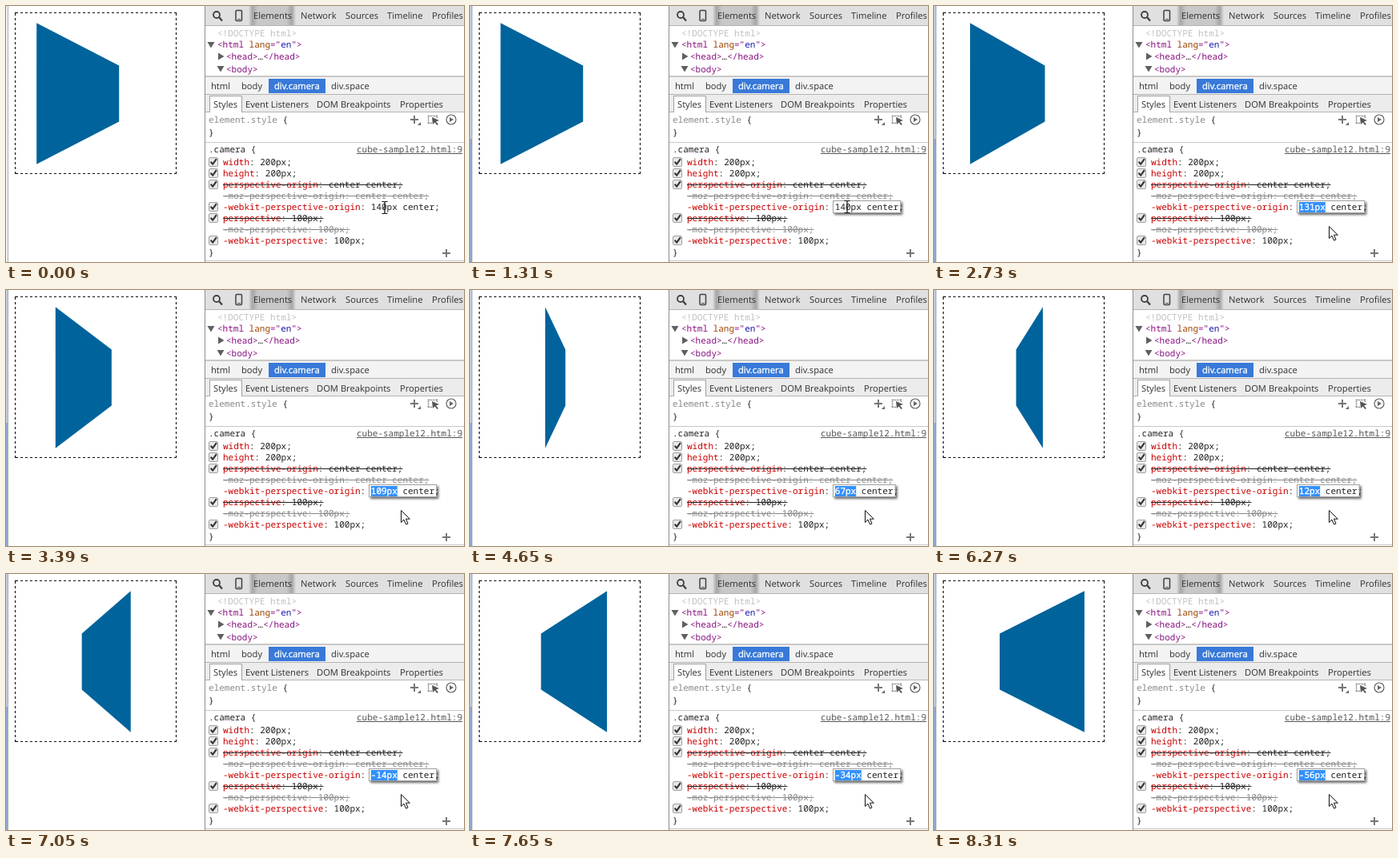
An HTML page for the animation above (9.24 s loop, 572x320 px).

```html
<!DOCTYPE html>
<html lang="en">
<head>
<meta charset="utf-8">
<title>Perspective origin</title>
<style>
html, body { margin: 0; width: 100%; height: 100%; overflow: hidden; background: #fff; }
svg { display: block; }
text { white-space: pre; text-rendering: geometricPrecision; }
.mono { font: 11px "Noto Sans Mono", "DejaVu Sans Mono", monospace; fill: #222; }
.ui { font: 11.2px "Open Sans", "Noto Sans", sans-serif; fill: #303030; }
.tag { fill: #881280; }
.attr { fill: #994500; }
.str { fill: #1a1aa6; }
.prop { fill: #c80000; }
.dim { fill: #888; }
.pale { fill: #c0c0c0; }
.link { fill: #555; }
.lit { fill: #fff; stroke: #fff; stroke-width: .35; }
.icon { fill: none; stroke: #606060; stroke-width: 1.5; }
</style>
</head>
<body>
<svg width="572" height="320" viewBox="0 0 572 320">
  <defs>
    <linearGradient id="tab">
      <stop offset="0" stop-color="#e0e0e0"/>
      <stop offset=".08" stop-color="#a6a6a6"/>
      <stop offset=".2" stop-color="#c8c8c8"/>
      <stop offset=".8" stop-color="#c8c8c8"/>
      <stop offset=".92" stop-color="#a6a6a6"/>
      <stop offset="1" stop-color="#e0e0e0"/>
    </linearGradient>
    <filter id="shade" x="-10%" y="-30%" width="125%" height="200%">
      <feDropShadow dx="2" dy="2" stdDeviation="1.5" flood-opacity=".6"/>
    </filter>
    <g id="check">
      <rect x=".5" y=".5" width="11" height="11" rx="1.5" fill="#e8e8e8" stroke="#a0a0a0"/>
      <path d="M2.6 5.8L5.2 8.700L9.900 2.200" fill="none" stroke="#333" stroke-width="2.100"/>
    </g>
  </defs>

  <g id="idle">
    <path d="M0 0H2V320H0Z" fill="#f0f0f0"/>
    <path d="M2.5 0V320" stroke="#b0b0b0"/>
  </g>
  <g id="active">
    <path d="M0 0H2V320H0Z" fill="#c4cbdc"/>
    <path d="M0 166H2V320H0Z" fill="#8fa9d4"/>
    <path d="M2.5 0V320" stroke="#a4aab8"/>
  </g>
  <path d="M12 8.500H212M12 209.500H212M11.500 9V209M212.500 9V209" stroke="#000" stroke-dasharray="3 3"/>
  <path d="M11 8h1v1h-1z M212 8h1v1h-1z M11 209h1v1h-1z M212 209h1v1h-1z"/>
  <polygon id="face" fill="#00639c"/>

  <g id="panel">
    <path d="M249 0H572V24H249Z" fill="#e0e0e0"/>
    <path d="M249 89H572V110H249Z" fill="#f3f3f3"/>
    <path d="M249 110H572V133H249Z" fill="#ececec"/>
    <path d="M303 0H362V24H303Z" fill="url(#tab)"/>
    <path d="M328 91H399V109H328Z" fill="#3879d9"/>
    <path d="M254.500 133V112.500H294.500V133" fill="#fff" stroke="#a0a0a0"/>
    <path d="M249 24.500H572M249 110.500H572M249 132.500H254M295 132.500H572" stroke="#b4b4b4"/>
    <path d="M249 88H572" stroke="#c8c8c8" stroke-width="2"/>
    <path d="M249 170.500H572M249 318.500H572" stroke="#c8c8c8"/>
    <path d="M248.500 0V320" stroke="#8c8c8c"/>

    <g class="icon">
      <circle cx="263" cy="11" r="4" stroke="#404040" stroke-width="1.8"/>
      <path d="M266 14L270 18.500" stroke="#404040" stroke-width="2.3"/>
      <rect x="287" y="5.500" width="7.500" height="13" rx="1.300" stroke="#404040"/>
      <path d="M289 16.500H293" stroke-width="1"/>
      <path d="M505 142H515M510 137V147" stroke-width="2" stroke="#777"/>
      <path d="M527 137.500H539M527 146.500H532M527.500 137V147M538.500 137V141" stroke-dasharray="1 1"/>
      <circle cx="556" cy="142" r="6" stroke-width="1.200"/>
      <path d="M545 309H555M550 304V314" stroke-width="2" stroke="#777"/>
    </g>
    <path d="M514 149H518V145Z M554 139V145L559 142Z" fill="#666"/>
    <path d="M532 139L541 143L537 144.500L540 148L538.500 149L535.500 145.500L533 148Z" fill="#555"/>
    <path d="M251.500 45H260.500L256 52.500Z M265 58.500L272.500 63L265 67.500Z M263.500 75H272.500L268 82.500Z" fill="#606060"/>
  </g>

  <use id="tick" href="#check" x="253" y="245"/>
  <g id="editor">
    <rect id="field" x="453.500" y="243.500" height="15" fill="#fff" stroke="#a0a0a0" filter="url(#shade)"/>
    <rect id="mark" x="455.800" y="245" height="13" fill="#3390ff"/>
  </g>
  <text id="value" class="mono" x="455.800" y="255"><tspan></tspan><tspan></tspan><tspan></tspan></text>

  <path id="beam" d="M-3.500 -7.500H-1Q0 -7.500 0 -6Q0 -7.500 1 -7.500H3.500M0 -6.500V6.500M-3.500 7.500H-1Q0 7.500 0 6Q0 7.500 1 7.500H3.500" fill="none" stroke="#111" stroke-width="1.200"/>
  <path id="arrow" d="M.5 .5V15.500L4 12.200L6.500 18L9 17L6.500 11.200H11.300Z" fill="#fff" stroke="#111"/>
</svg>
<script>
const $ = id => document.getElementById(id);
const panel = $("panel");
const CHAR = 6.6, LOOP = 9240;

function add(tag, attrs, parent = panel) {
  const el = document.createElementNS("http://www.w3.org/2000/svg", tag);
  for (const key in attrs) el.setAttribute(key, attrs[key]);
  parent.append(el);
  return el;
}

// Each part is a plain string or a [class, string] pair.
function write(font, x, y, ...parts) {
  const line = add("text", { class: font, x, y });
  for (const part of parts) {
    const [cls, str] = Array.isArray(part) ? part : ["", part];
    add("tspan", { class: cls }, line).textContent = str;
  }
}

function strike(y, chars, color) {
  add("path", { d: `M271 ${y - 3.5}h${chars * CHAR}`, stroke: color });
}

function declare(y, name, value, state = "") {
  const dim = state === "dim";
  write("mono", 271, y, [dim ? "dim" : "prop", name], [dim ? "dim" : "", ": " + value]);
  if (state) strike(y, name.length + 2 + value.length, dim ? "#888" : "#222");
  if (!dim && value) add("use", { href: "#check", x: 253, y: y - 10 });
}

[[309, "Elements"], [368, "Network"], [424, "Sources"], [476, "Timeline"], [532, "Profiles"]]
  .forEach(([x, label]) => write("ui", x, 16, label));
[[256, "html"], [294, "body"], [406, "div.space"]]
  .forEach(([x, label]) => write("ui", x, 104, label));
write("ui", 335, 104, ["lit", "div.camera"]);
[[259, "Styles"], [299, "Event Listeners"], [388, "DOM Breakpoints"], [492, "Properties"]]
  .forEach(([x, label]) => write("ui", x, 127, label));

write("mono", 264, 38, ["pale", "<!DOCTYPE html>"]);
write("mono", 264, 52, ["tag", "<html "], ["attr", "lang"], ["tag", "=\""], ["str", "en"], ["tag", "\">"]);
write("mono", 275, 67, ["tag", "<head>"], "…", ["tag", "</head>"]);
write("mono", 275, 83, ["tag", "<body>"]);

write("mono", 253, 146, ["dim", "element.style"], " {");
write("mono", 253, 162, "}");
write("mono", 253, 183, ".camera {");
write("mono", 438, 183, ["link", "cube-sample12.html:9"]);
add("path", { d: "M438 184.5H570", stroke: "#555" });
declare(199, "width", "200px;");
declare(213, "height", "200px;");
declare(227, "perspective-origin", "center center;", "off");
declare(241, "-moz-perspective-origin", "center center;", "dim");
declare(255, "-webkit-perspective-origin", "");
declare(269, "perspective", "100px;", "off");
declare(283, "-moz-perspective", "100px;", "dim");
declare(297, "-webkit-perspective", "100px;");
write("mono", 253, 312, "}");

// One key press, then key repeat at two units per 60 ms.
function originAt(t) {
  if (t < 2020) return 140;
  if (t < 2550) return 139;
  const step = Math.floor((Math.min(t, 8310) - 2550) / 60);
  return 137 - 2 * step - (t >= 5040 ? 1 : 0);
}

// A 100px square turned 60 degrees, seen from 100px.
function drawFace(origin) {
  const depth = 50 * Math.sin(Math.PI / 3);
  const near = 100 / (100 - depth), far = 100 / (100 + depth);
  const xn = 12.8 + origin + (75 - origin) * near;
  const xf = 11.7 + origin + (125 - origin) * far;
  const yn = 50 * near, yf = 50 * far, mid = 109.5;
  $("face").setAttribute("points",
    `${xn},${mid - yn} ${xf},${mid - yf} ${xf},${mid + yf} ${xn},${mid + yn}`);
}

function drawValue(t, origin) {
  const first = origin + "px", rest = " center";
  const length = first.length + rest.length;
  const editing = t >= 530;
  const all = editing && t < 1310, word = t >= 2020;
  const spans = $("value").children;
  [first, rest, ";"].forEach((str, i) => { spans[i].textContent = str; });
  spans[0].setAttribute("class", all || word ? "lit" : "");
  spans[1].setAttribute("class", all ? "lit" : "");
  $("field").setAttribute("width", length * CHAR + 5);
  $("mark").setAttribute("width", CHAR * (all ? length : word ? first.length : 0));
  show("editor", editing);
  show("tick", !editing);
}

function drawPointer(t) {
  const path = [[0, 473, 252], [990, 472, 251], [1050, 471, 251], [1640, 475, 256],
    [1700, 482, 264], [1760, 489, 271], [1820, 493, 275]];
  const [, x, y] = path.filter(p => p[0] <= t).pop();
  const inText = y < 260;
  show("beam", inText);
  show("arrow", !inText);
  $(inText ? "beam" : "arrow").setAttribute("transform", `translate(${x} ${y})`);
}

function show(id, on) {
  $(id).style.display = on ? "" : "none";
}

function draw(t) {
  const origin = originAt(t);
  show("idle", t < 400);
  show("active", t >= 400);
  drawFace(origin);
  drawValue(t, origin);
  drawPointer(t);
}

const start = performance.now();
function tick() {
  draw((performance.now() - start) % LOOP);
  requestAnimationFrame(tick);
}
tick();
</script>
</body>
</html>
```
